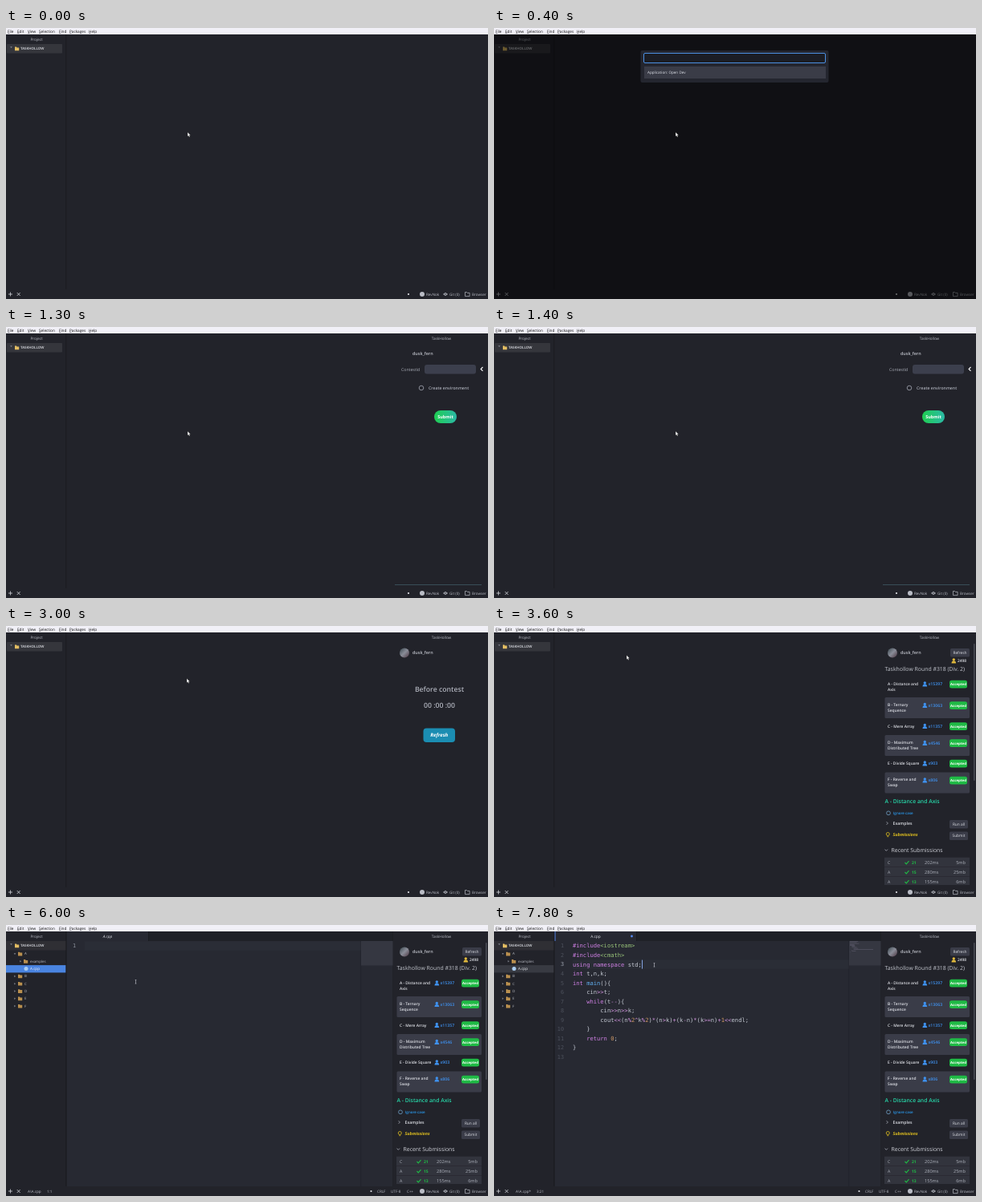
An HTML page for the animation above (8 s loop, 600x338 px).

```html
<!DOCTYPE html>
<html lang="en">
<head>
<meta charset="utf-8">
<title>Editor contest panel</title>
<style>
  html, body { margin: 0; width: 100%; height: 100%; overflow: hidden; background: #22232a; }
  svg { display: block; width: 600px; height: 338px; }
  text { font-family: "Open Sans", "Noto Sans", sans-serif; font-weight: 500; white-space: pre; text-rendering: geometricPrecision; }
  .code { font-family: "DejaVu Sans Mono", "Noto Sans Mono", monospace; }
  .b { font-weight: 600; }
  .bb { font-weight: 700; }
  .i { font-style: italic; }
  .mid { text-anchor: middle; }
  .end { text-anchor: end; }
</style>
</head>
<body>
<svg id="stage" viewBox="0 0 600 338" xmlns="http://www.w3.org/2000/svg"></svg>
<script>
const LOOP = 8000, STEP = 100;
const BG = '#22232a', GREY = '#abafb9', LIGHT = '#dfe1e7', ROW = '#3a3c48', BLUE = '#3f92f0', GREEN = '#1fba45';

const esc = s => s.replace(/&/g, '&amp;').replace(/</g, '&lt;').replace(/>/g, '&gt;');
// y is the middle of the lowercase line
const text = (x, y, s, size, fill = GREY, cls = '') =>
  `<text x="${x}" y="${y + size * .34}" font-size="${size}" fill="${fill}" class="${cls}">${esc(s)}</text>`;
const rect = (x, y, w, h, fill, r = 0, more = '') =>
  `<rect x="${x}" y="${y}" width="${w}" height="${h}" rx="${r}" fill="${fill}" ${more}/>`;
const dot = (x, y, r, fill) => `<circle cx="${x}" cy="${y}" r="${r}" fill="${fill}"/>`;
const ring = (x, y, r, color) => `<circle cx="${x}" cy="${y}" r="${r}" fill="none" stroke="${color}" stroke-width=".8"/>`;
const line = (d, color, w = .8) => `<path d="${d}" fill="none" stroke="${color}" stroke-width="${w}"/>`;
const during = (from, to, ...parts) => `<g data-from="${from}" data-to="${to}">${parts.join('')}</g>`;

const person = (x, y, color) =>
  dot(x, y - 1.5, 1.7, color) + `<path d="M${x - 2.8} ${y + 3}q0-3 2.8-3t2.8 3z" fill="${color}"/>`;
const folder = (x, y, color) =>
  `<path d="M${x} ${y - 2.2}h2l.7.8h2.5v3.8h-5.2z" fill="${color}"/>`;
const chevron = (x, y, open, color = GREY) =>
  line(open ? `M${x - 1.8} ${y - .9}l1.8 1.8 1.8-1.8` : `M${x - .9} ${y - 1.8}l1.8 1.8-1.8 1.8`, color);
const tick = (x, y, open) =>
  `<path d="${open ? `M${x - 1.3} ${y - .7}h2.6l-1.3 1.7z` : `M${x - .7} ${y - 1.3}v2.6l1.7-1.3z`}" fill="#888c96"/>`;
const button = (x, y, w, h, label) => rect(x, y, w, h, ROW, 1.5) + text(x + w / 2, y + h / 2, label, 4.8, LIGHT, 'mid');

function menuBar() {
  const items = [[2, 'File'], [14, 'Edit'], [27, 'View'], [41, 'Selection'], [66, 'Find'], [79, 'Packages'], [103, 'Help']];
  return rect(0, 0, 600, 8, '#f1f0f7') + items.map(([x, s]) =>
    text(x, 4, s, 4.7, '#111') + line(`M${x} 6.6h2.6`, '#333', .5)).join('');
}

function statusBar() {
  const ink = '#b9bcc5';
  return rect(0, 326, 600, 12, BG)
    + line('M3 332h5M5.5 329.5v5', '#d0d2d8') + line('M13.7 330l4 4m0-4l-4 4', '#d0d2d8')
    + dot(518, 332, 3, ink) + text(523, 332, 'RevNok', 4.6, ink)
    + line('M544 332h6', ink, .7) + ring(547, 332, 1.5, ink) + text(552, 332, 'Git (0)', 4.6, ink)
    + line('M571.5 329.5h2l.8.9h2.8v4.2h-5.6z', ink, .7) + text(580, 332, 'Browser', 4.6, ink)
    + during(0, 5700, dot(501, 332, 1.1, '#e4e5ea'))
    + during(5700, LOOP, dot(454.5, 332, 1.1, '#e4e5ea'), text(462, 332, 'CRLF', 4.6, ink),
        text(479, 332, 'UTF-8', 4.6, ink), text(499, 332, 'C++', 4.6, ink))
    + during(5700, 7500, text(27, 332, 'A\\A.cpp', 4.6, ink))
    + during(7500, LOOP, text(27, 332, 'A\\A.cpp*', 4.6, ink))
    + during(5700, 7200, text(51, 332, '1:1', 4.6, ink))
    + during(7200, 7500, text(51, 332, '13:1', 4.6, ink))
    + during(7500, 7700, text(53, 332, '13:1', 4.6, ink))
    + during(7700, LOOP, text(53, 332, '3:21', 4.6, ink));
}

function tree() {
  const rowY = n => 26.7 + n * 9.3;
  const select = (n, color) => rect(0, rowY(n) - 4.5, 74.3, 9.3, color);
  const dir = (n, name, x = 11, open = false) =>
    tick(x, rowY(n), open) + folder(x + 4, rowY(n), '#b98f4e') + text(x + 12, rowY(n), name, 4.4, '#b9bcc5');
  const dirs = (names, start) => names.map((s, k) => dir(start + k, s)).join('');
  const root = color => rect(0, 20, 74.3, 11.5, color);
  const picked = '#4a84e0';
  return text(38, 14, 'Project', 4.7, '#b9bcc5', 'mid')
    + during(0, 5000, rect(1, 20, 69, 11.5, '#35363c', 1))
    + during(5000, 5300, root(picked))
    + during(5300, LOOP, root('#2f2f34'))
    + during(5300, 5700, select(1, picked))
    + during(5700, 6300, select(3, picked))
    + during(6300, LOOP, select(3, '#383a42'))
    + tick(6.5, 24, true) + folder(11, 25.8, '#e3bd62') + text(18, 26, 'TASKHOLLOW', 4.4, LIGHT, 'b')
    + during(5000, 5300, dirs([...'ABCDEF'], 1))
    + during(5300, LOOP, dir(1, 'A', 11, true), dir(2, 'examples', 18),
        dot(25, rowY(3), 2.5, '#a9cdf2'), text(30, rowY(3), 'A.cpp', 4.6, '#eceef3'), dirs([...'BCDEF'], 4));
}

function palette() {
  return during(300, 1200,
    rect(0, 8, 600, 330, '#000', 0, 'opacity=".53"'),
    rect(182.5, 28, 234, 40, '#24262f', 2),
    rect(186.5, 31.5, 226, 12, '#1b1d24', 1.5, 'stroke="#4c90e2"'),
    '<text id="query" x="190" y="39.2" font-size="4.7" fill="#d3d5dc"></text>',
    rect(187, 48, 226, 15, '#3a3c47'),
    text(191, 55.6, 'Application: Open Dev', 4.6, '#dfe2ea'));
}

function form() {
  return during(1200, 2800,
    text(492, 53, 'ContestId', 5.2), rect(521, 47, 64, 11.5, '#3c3f4d', 3),
    '<text id="contest" x="525" y="54.8" font-size="5" fill="#d3d5dc"></text>',
    line('M593.5 50l-2.4 2.4 2.4 2.4', '#fff', 1.1),
    ring(517, 76, 2.8, '#a4a8b3'), text(526, 76, 'Create environment', 5.2, GREY, 'b'),
    during(2600, 2800, dot(517, 76, 1.5, BLUE)),
    rect(533, 104, 28, 16, 'url(#pill)', 8), text(547, 112, 'Submit', 5.5, '#fff', 'bb mid'),
    line('M484 321.5h108', '#3f5a64'));
}

function countdown() {
  return during(2800, 3200,
    text(539.5, 79.5, 'Before contest', 8.7, '#adb0ba', 'b mid'),
    text(539.5, 99, '00 :00 :00', 8.7, '#adb0ba', 'b mid'),
    rect(519.5, 127.5, 39.5, 17.5, '#1b8db2', 4), text(539.3, 136.3, 'Refresh', 6.2, '#fff', 'bb i mid'));
}

function contest() {
  const tasks = [
    [72, 72.5, 'x15397', 'A - Distance and', 'Axis'], [98.5, 99, 'x13063', 'B - Ternary', 'Sequence'],
    [125, 125, 'x11357', 'C - Mere Array'], [145.5, 146, 'x4546', 'D - Maximum', 'Distributed Tree'],
    [171.5, 171.5, 'x903', 'E - Divide Square'], [191.5, 192.5, 'x806', 'F - Reverse and', 'Swap']];
  const task = ([y, mid, count, name, rest = ''], k) =>
    (k % 2 ? rect(486.5, mid - 10, 105.5, 26, ROW, 1.5) : '')
    + text(490, y, name, 4.9, LIGHT, 'b') + text(490, y + 7.2, rest, 4.9, LIGHT, 'b')
    + person(536.3, mid, BLUE) + text(540.5, mid, count, 5.2, BLUE, 'b')
    + rect(567, mid - 4.8, 22, 9.8, GREEN, 2.5) + text(578, mid + .1, 'Accepted', 4.3, '#fff', 'bb mid');
  const runs = [['C', '21', '202ms', '5mb'], ['A', '15', '280ms', '25mb'], ['A', '13', '155ms', '6mb']];
  const run = ([id, n, time, mem], k) => {
    const y = 295 + k * 12;
    return rect(486, y - 6.3, 106, k < 2 ? 11.6 : 10.3, '#32343d') + text(490, y, id, 5.2)
      + line(`M511.5 ${y}l1.8 1.9 3.2-3.8`, GREEN, 1.1) + text(520, y, n, 5, GREEN, 'bb')
      + text(536, y, time, 5.6) + text(587, y, mem, 5.6, GREY, 'end');
  };
  return during(3200, LOOP,
    button(568, 28, 24, 10.5, 'Refresh'),
    person(572.3, 43.5, '#e0b93c'), text(577, 43.8, '2498', 4.9, LIGHT, 'b'),
    text(486.5, 53.8, 'Taskhollow Round #318 (Div. 2)', 6.9, '#c3c6ce'),
    tasks.map(task).join(''),
    text(486.5, 218.5, 'A - Distance and Axis', 6.8, '#27d6a8', 'b'),
    ring(491, 233.3, 2.4, '#6f9fc4'), text(497, 233.2, 'Ignore case', 4.5, '#2b9df2', 'b'),
    chevron(489.5, 246, false), text(496.5, 246, 'Examples', 5.2, LIGHT, 'b'),
    ring(490.3, 259.5, 2, '#e3c21f'), line('M489.3 262.7h2', '#e3c21f'),
    text(496.5, 260.3, 'Submissions', 5.3, '#e3c21f', 'bb i'),
    button(567, 242, 23, 10.5, 'Run all'), button(567, 256.5, 23, 10.5, 'Submit'),
    chevron(488.3, 279.5, true), text(494.5, 279.5, 'Recent Submissions', 6.9, '#d0d2d9'),
    rect(597, 22, 1.6, 171, '#4a4c55', .8),
    during(3500, LOOP, runs.map(run).join('')));
}

function contestDock() {
  return during(1200, LOOP,
    rect(482, 8, 118, 318, BG),
    text(542, 14, 'TaskHollow', 4.7, '#b9bcc5', 'mid'),
    during(1500, LOOP, dot(496, 33.5, 6, 'url(#avatar)')),
    text(506, 33.5, 'dusk_fern', 5.4, '#c0c3cb', 'b'),
    form(), countdown(), contest());
}

const SOURCE = `#include<iostream>
#include<cmath>
using namespace std;
int t,n,k;
int main(){
    cin>>t;
    while(t--){
        cin>>n>>k;
        cout<<(n%2^k%2)*(n>k)+(k-n)*(k>=n)+1<<endl;
    }
    return 0;
}`.split('\n');
const TOKENS = /(#include|using|namespace|int|while|return)|(<\w+>)|(main)|(\d+)|([<>=+*^%-]+)/g;
const TOKEN_COLORS = ['#cf80e4', '#98c379', '#61afef', '#d19a66', '#cf92dc'];

const lineY = n => 26 + (n - 1) * 11.55;

function paint(src) {
  let out = '', at = 0;
  for (const m of src.matchAll(TOKENS)) {
    const kind = m.slice(1).findIndex(Boolean);
    out += esc(src.slice(at, m.index)) + `<tspan fill="${TOKEN_COLORS[kind]}">${esc(m[0])}</tspan>`;
    at = m.index + m[0].length;
  }
  return out + esc(src.slice(at));
}

function editor() {
  const size = 7.13;
  const number = (n, color = '#4d515c') => text(87, lineY(n), String(n), 6.8, color, 'code end');
  const active = n => rect(98, lineY(n) - 5.7, 343.5, 11.5, '#2a2d36') + number(n, '#8d929d');
  const caret = (x, n) => rect(x, lineY(n) - 5.5, .9, 11, '#8fb2f5');
  const map = SOURCE.map((s, k) => {
    const indent = s.search(/\S/);
    return rect(443 + indent * .57, 20.4 + k * 1.2, (s.length - indent) * .57, .6, '#5d5a6b');
  }).join('');
  return during(5700, LOOP,
    rect(76, 8, 406, 12, '#1f2127'), rect(76, 8, 101, 12, '#272932'), rect(177, 8, .7, 12, '#181a1f'),
    rect(76, 20, 406, 306, '#272932'), rect(481.5, 8, .8, 318, '#1a1c21'),
    rect(441.5, 20, .6, 306, '#1f2128'), rect(442, 20, 39.5, 30.5, '#353741'),
    during(6300, LOOP, rect(75.6, 8, .9, 12, '#568af2')),
    during(5700, 7500, text(126.5, 14, 'A.cpp', 4.8, LIGHT, 'i mid')),
    during(7500, LOOP, text(126.5, 14, 'A.cpp', 4.8, LIGHT, 'mid'), dot(171.5, 14, 1.4, '#568af2')),
    during(5700, 7200, active(1)),
    during(6300, 6600, caret(98, 1)), during(7000, 7200, caret(98, 1)),
    during(7200, LOOP,
      Array.from({ length: 13 }, (_, k) => number(k + 1)).join(''),
      during(7200, 7700, active(13), caret(98, 13)),
      during(7700, LOOP, active(3), caret(184, 3)),
      SOURCE.map((s, k) => `<text class="code" x="98" y="${lineY(k + 1) + 2.4}" font-size="${size}" fill="#c3c8d2">${paint(s)}</text>`).join(''),
      map));
}

const stage = document.getElementById('stage');
stage.innerHTML = `<defs>
  <linearGradient id="pill"><stop stop-color="#1fce52"/><stop offset="1" stop-color="#2bb9a6"/></linearGradient>
  <linearGradient id="avatar" x2="1" y2="1"><stop stop-color="#39474f"/><stop offset=".5" stop-color="#8a8d98"/><stop offset="1" stop-color="#4a3440"/></linearGradient>
</defs>` + rect(0, 0, 600, 338, BG) + rect(74.3, 8, .9, 318, '#1a1b20') + editor() + tree() + contestDock()
  + during(4000, 5700, line('M77.5 165l-2 2 2 2', '#e4e5ea', .9))
  + statusBar() + palette() + menuBar()
  + `<path id="arrow" d="M0 0v5.2l1.2-1 .9 1.9 1-.5-.9-1.8h1.6z" fill="#fff" stroke="#111" stroke-width=".3"/>`
  + `<path id="beam" d="M-.8 0h1.6M0 0v4.6M-.8 4.6h1.6" stroke="#c9ccd4" stroke-width=".6" fill="none"/>`;

// time, x, y of the pointer
const PATH = [
  [0, 226, 130], [1400, 226, 130], [1800, 478, 160], [1900, 478, 160], [2200, 553, 50], [2500, 553, 50],
  [2600, 516, 74], [2700, 543, 110], [2800, 543, 110], [3000, 225, 65.5], [3100, 225, 65.5], [3300, 209, 33],
  [3400, 209, 33], [4100, 55, 45], [4600, 55, 45], [4800, 12, 25], [5100, 12, 25], [5300, 14, 35],
  [5500, 32, 53], [5700, 32, 53], [6000, 161.5, 68.5], [6400, 290, 120], [7400, 290, 120], [7700, 199.5, 47.5], [LOOP, 199.5, 47.5]];

function pointerAt(t) {
  const k = PATH.findIndex(p => p[0] > t);
  const [t0, x0, y0] = PATH[k - 1], [t1, x1, y1] = PATH[k];
  const u = (t - t0) / (t1 - t0);
  return [x0 + (x1 - x0) * u, y0 + (y1 - y0) * u];
}

const timed = [...stage.querySelectorAll('[data-from]')].map(el => [el, +el.dataset.from, +el.dataset.to]);
const [query, entry, arrow, beam] = ['query', 'contest', 'arrow', 'beam'].map(id => document.getElementById(id));
const typed = (s, t, start, per) => s.slice(0, Math.max(0, Math.floor((t - start) / per) + 1));

function draw(now) {
  const t = Math.floor((now % LOOP) / STEP) * STEP;
  for (const [el, from, to] of timed) el.style.display = t >= from && t < to ? '' : 'none';
  query.textContent = typed('codev', t, 500, 100);
  entry.textContent = typed('1401', t, 2300, 50);
  const [x, y] = pointerAt(t), inEditor = t >= 5700 && x > 76;
  for (const [el, on] of [[arrow, !inEditor], [beam, inEditor]]) {
    el.style.display = on ? '' : 'none';
    el.setAttribute('transform', `translate(${x} ${y})`);
  }
}

const start = performance.now();
(function tickFrame() {
  draw(performance.now() - start);
  requestAnimationFrame(tickFrame);
})();
</script>
</body>
</html>
```
